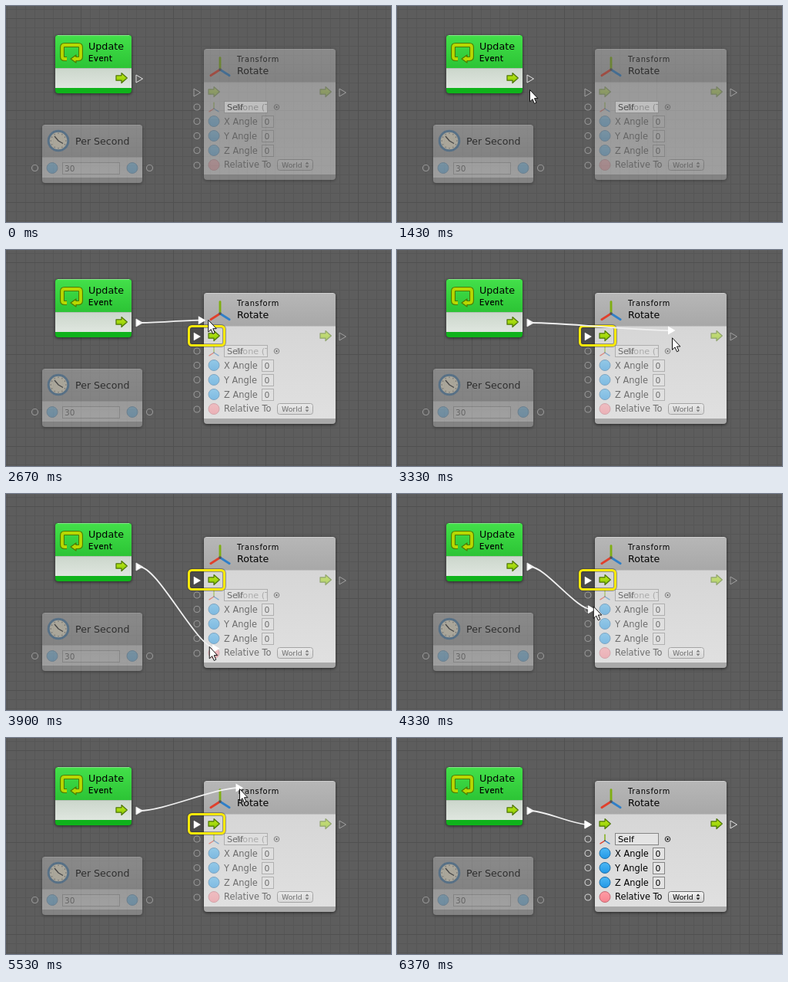
Write an HTML page that moves like this. It is 500 px wide and 282 px high and loops after 7.71 s.

```html
<!DOCTYPE html>
<html lang="en">
<head>
<meta charset="utf-8">
<title>Connecting nodes</title>
<style>
  html, body { margin: 0; width: 100%; height: 100%; overflow: hidden; background: #5b5b5b; }
  svg { display: block; width: 100%; height: 100%; }
  text { font-family: "DejaVu Sans", sans-serif; fill: #000; white-space: pre; }
  .small { font-size: 9.8px; letter-spacing: .7px; }
</style>
</head>
<body>
<svg id="stage" viewBox="0 0 500 282" xmlns="http://www.w3.org/2000/svg"></svg>
<script>
const LOOP = 7710, HOVER = 1600, DRAG = 2130, DROP = 5700, LEAVE = 6370;
const OUT = [173, 95], IN = [248, 113];

const text = (x, y, size, s, extra = '') => `<text x="${x}" y="${y}" font-size="${size}" ${extra}>${s}</text>`;
const rect = (x, y, w, h, fill, extra = '') =>
  `<rect x="${x}" y="${y}" width="${w}" height="${h}" fill="${fill}" ${extra}/>`;
const gradient = (id, a, b) =>
  `<linearGradient id="${id}" x2="0" y2="1"><stop stop-color="${a}"/><stop offset="1" stop-color="${b}"/></linearGradient>`;
const lines = (id, size, color, x, y) =>
  `<pattern id="${id}" x="${x}" y="${y}" width="${size}" height="${size}" patternUnits="userSpaceOnUse">
    <path d="M.5 0V${size}M0 .5H${size}" stroke="${color}" fill="none"/></pattern>`;

const ring = (x, y) => `<circle cx="${x}" cy="${y}" r="4" fill="none" stroke="#d2d2d2" stroke-width="1.1"/>`;
const dot = (x, y, kind) =>
  `<circle cx="${x}" cy="${y}" r="7" fill="url(#${kind})" stroke="${kind === 'blue' ? '#1f6ea8' : '#c46a74'}"/>`;
const port = (x, y, id = '') =>
  `<path ${id && `id="${id}"`} d="M${x - 4} ${y - 5}L${x + 4.5} ${y}L${x - 4} ${y + 5}Z" fill="none" stroke="#e2e2e2"/>`;
const arrow = (x, y) =>
  `<path transform="translate(${x} ${y})" d="M-7 -3.200H0V-6.500L7.300 0L0 6.500V3.200H-7Z" fill="url(#lime)" stroke="#4d7508" stroke-width="1.2" stroke-linejoin="round"/>`;
const field = (x, y, w, h) => rect(x + .5, y + .5, w - 1, h - 1, '#e4e4e4', 'stroke="#858585"');

function axes(x, y, s) {
  const arm = (dx, dy, c) => `<path d="M0 0L${dx} ${dy}" stroke="${c}" stroke-width="2.600" stroke-linecap="round"/>`;
  return `<g transform="translate(${x} ${y}) scale(${s})">` +
    arm(0, -14, '#7fae12') + arm(-11, 7, '#e0402c') + arm(11, 7, '#2f7fc8') +
    '<circle r="1.6" fill="#555"/></g>';
}

function frame(x, y, w, h, head, fill, foot, body) {
  return rect(x - 1, y, w + 2, h + 2, '#000', 'rx="5" opacity=".4" filter="url(#soft)"') +
    rect(x, y, w, h, foot, 'rx="4"') +
    `<path d="M${x} ${y + head}V${y + 4}q0 -4 4 -4h${w - 8}q4 0 4 4V${y + head}Z" fill="url(#${fill})"/>` +
    rect(x, y + head, w, h - head - 7, `url(#${body})`) +
    `<path d="M${x} ${y + head + .5}h${w}" stroke="#000" opacity=".1"/>` +
    `<path d="M${x + 3} ${y + .5}h${w - 6}" stroke="#fff" opacity=".35"/>`;
}

function updateNode() {
  const loop = 'M79 69H76Q73 69 73 66V54Q73 51 76 51H94Q97 51 97 54V66Q97 69 94 69H90';
  return frame(64, 38, 99, 76, 43, 'green', '#0fb31b', 'pale') +
    `<g fill="none" stroke-linejoin="round"><path d="${loop}" stroke="#4f7a00" stroke-width="6"/>
     <path d="M91 64V74L84 69Z" fill="#b8d800" stroke="#4f7a00" stroke-width="1.2"/>
     <path d="${loop}" stroke="#b8d800" stroke-width="3.800"/></g>` +
    text(107, 57, 12.7, 'Update') + text(107, 72, 9.8, 'Event', 'class="small" stroke="#000" stroke-width=".25"') +
    arrow(150, 94) + port(...OUT, 'outPort');
}

function secondNode() {
  let ticks = '';
  for (let a = 0; a < 360; a += 30) ticks += `<path d="M0 -10.500V-9" transform="rotate(${a})"/>`;
  return frame(47, 155, 130, 76, 42, 'grey', '#a9a9a9', 'light') +
    `<g transform="translate(68 176)" fill="none" stroke="#777"><circle r="12.800" fill="#f6efd8" stroke="#5585b0" stroke-width="3"/>
     ${ticks}<path d="M-5 -6L0 0L6 3.500" stroke="#333" stroke-width="1.4"/></g>` +
    text(90, 181, 12.6, 'Per Second') +
    '<g opacity=".5">' + field(73, 204, 75, 16) + text(76, 216, 10.5, '30') +
    dot(60, 211.5, 'blue') + dot(164, 211.5, 'blue') + '</g>' + ring(37.5, 211.5) + ring(186.5, 211.5);
}

function rotateNode() {
  const angles = ['X', 'Y', 'Z'].map((n, i) => {
    const y = 150.5 + i * 19;
    return dot(270, y, 'blue') + text(283, y + 4, 11.4, n + ' Angle') +
      field(332, Math.round(y - 7.6), 16, 16) + text(335.5, y + 4.5, 10.8, '0');
  }).join('');
  const rings = [132, 150.5, 169.5, 188.5, 208].map(y => ring(248, y)).join('');
  return frame(257, 56, 171, 171, 43, 'grey', '#a9a9a9', 'light') + axes(278, 83, 1.1) +
    text(300, 73, 9.8, 'Transform', 'class="small"') + text(300, 89, 12.6, 'Rotate') +
    `<g id="inArrow">${arrow(270, 112)}</g>` + port(...IN, 'inPort') +
    `<g id="ports">${rings}${port(437, 113)}</g>` +
    '<g id="rows">' + arrow(415, 112) + axes(270, 134, .55) +
    '<circle cx="351.500" cy="132" r="3.300" fill="none" stroke="#222"/><circle cx="351.500" cy="132" r="1.200"/>' +
    angles + dot(270, 207.5, 'pink') + text(283, 211, 11.4, 'Relative To') +
    rect(352.5, 200.5, 46, 14, 'url(#button)', 'rx="3" stroke="#6b6b6b"') + text(358, 211, 9.3, 'World') +
    '<path d="M388.500 206.500L391 203.500L393.500 206.500ZM388.500 208.500L391 211.500L393.500 208.500Z" fill="#222"/></g>';
}

const selfField = () => field(283, 124, 57, 16) +
  text(299, 136, 11.2, 'None (T', 'id="none" opacity=".45" clip-path="url(#slot)"') +
  text(287, 136, 11.2, 'Self');

const $ = id => document.getElementById(id);
$('stage').innerHTML = '<defs>' +
  lines('minor', 12, '#565656', 1, 4) + lines('major', 120, '#505050', 97, 16) +
  gradient('green', '#43e04a', '#2cc435') + gradient('pale', '#cbd6cb', '#dfe6df') +
  gradient('grey', '#b7b7b7', '#a8a8a8') + gradient('light', '#d6d6d6', '#e0e0e0') +
  gradient('blue', '#4db8f5', '#2298e6') + gradient('pink', '#ff9ca5', '#f6848f') +
  gradient('lime', '#c3ea1c', '#86c900') + gradient('button', '#f4f4f4', '#d2d2d2') +
  '<filter id="soft" x="-10%" y="-10%" width="120%" height="120%"><feGaussianBlur stdDeviation="1.500"/></filter>' +
  '<clipPath id="slot"><rect x="284" y="125" width="55" height="14"/></clipPath></defs>' +
  rect(0, 0, 500, 282, '#5d5d5d') + rect(0, 0, 500, 282, 'url(#minor)') + rect(0, 0, 500, 282, 'url(#major)') +
  updateNode() + `<g opacity=".5">${secondNode()}</g><g id="rotate">${rotateNode()}</g><g id="self">${selfField()}</g>` +
  `<g id="glow">${rect(237.5, 99.5, 46, 25, 'none', 'rx="4" stroke="#222" stroke-opacity=".4" stroke-width="5"')}
    ${rect(239, 101, 18, 22, '#333', 'opacity=".4"')}
    ${rect(237.5, 99.5, 46, 25, 'none', 'rx="4" stroke="#fbe90a" stroke-width="3"')}
    <path d="M244 108L252.500 113L244 118Z" fill="#fff"/></g>
  <path id="wire" fill="none" stroke="#f0f0f0" stroke-width="1.8"/>
  <path id="tip" d="M-4.500 -5.500L5 0L-4.500 5.500Z" fill="#fff"/>
  <path id="cursor" d="M.5 .5V16L4 12.700L6.500 18.500L9 17.300L6.500 11.700H11Z" fill="#fff" stroke="#111" stroke-width="1" stroke-linejoin="round"/>`;

// Pointer path: time, x, y
const path = [
  [870, 281, 281], [1050, 246, 228], [1250, 198, 150], [1430, 172, 109], [1630, 171, 100], [1730, 171, 97],
  [2130, 171, 97], [2380, 199, 96], [2670, 262, 91], [2880, 335, 83], [3030, 353, 81.5],
  [3200, 353, 81.5], [3330, 357, 114], [3580, 345, 188], [3740, 312, 216], [3900, 264, 199], [3970, 245, 196],
  [4000, 245, 196], [4250, 250, 158], [4520, 269, 122], [4700, 273, 107], [4830, 269, 101],
  [5020, 286, 78], [5230, 303, 65], [5510, 303, 65], [5530, 303, 66], [5680, 303, 66], [5700, 303, 67],
  [6030, 303, 67], [6200, 298, 125], [6370, 319, 283]
];

// Monotone cubic interpolation, so rests stay still and nothing overshoots.
function track(t, axis) {
  const n = path.length - 1;
  if (t <= path[0][0]) return path[0][axis];
  if (t >= path[n][0]) return path[n][axis];
  let i = 0;
  while (t >= path[i + 1][0]) i++;
  const rate = k => (path[k + 1][axis] - path[k][axis]) / (path[k + 1][0] - path[k][0]);
  const slope = k => {
    if (k === 0) return rate(0);
    if (k === n) return rate(n - 1);
    const a = rate(k - 1), b = rate(k);
    return a * b <= 0 ? 0 : 2 * a * b / (a + b);
  };
  const h = path[i + 1][0] - path[i][0], u = (t - path[i][0]) / h, v = 1 - u;
  return path[i][axis] * v * v * (1 + 2 * u) + path[i + 1][axis] * u * u * (3 - 2 * u) +
    h * u * v * (slope(i) * v - slope(i + 1) * u);
}
const pointer = t => [track(t, 1), track(t, 2)];

const show = (id, on) => $(id).setAttribute('visibility', on ? 'visible' : 'hidden');
const set = (id, name, value) => $(id).setAttribute(name, value);
const move = (id, [x, y]) => set(id, 'transform', `translate(${x.toFixed(2)} ${y.toFixed(2)})`);

function draw(t) {
  const dragging = t >= DRAG && t < DROP, linked = t >= DROP;
  const fade = on => on ? 1 : .5;
  set('rotate', 'opacity', fade(t >= DRAG));
  set('inArrow', 'opacity', fade(t >= DRAG));
  set('rows', 'opacity', fade(linked));
  set('self', 'opacity', fade(linked));
  set('ports', 'opacity', fade(!dragging));
  set('outPort', 'fill', t >= HOVER ? '#fff' : 'none');
  set('inPort', 'fill', t >= DRAG ? '#fff' : 'none');
  show('none', !linked);
  show('glow', dragging);
  show('wire', t >= DRAG);
  show('tip', t >= DRAG);
  show('cursor', t >= 870 && t < LEAVE);
  move('cursor', pointer(t));

  const end = linked ? IN : pointer(Math.max(DRAG, t - 30));
  const bend = Math.abs(end[0] - OUT[0]) * .25;
  set('wire', 'd', `M${OUT}C${OUT[0] + bend} ${OUT[1]} ${end[0] - bend} ${end[1]} ${end}`);
  move('tip', end);
}

const start = performance.now();
function tick() {
  draw((performance.now() - start) % LOOP);
  requestAnimationFrame(tick);
}
tick();
</script>
</body>
</html>
```
